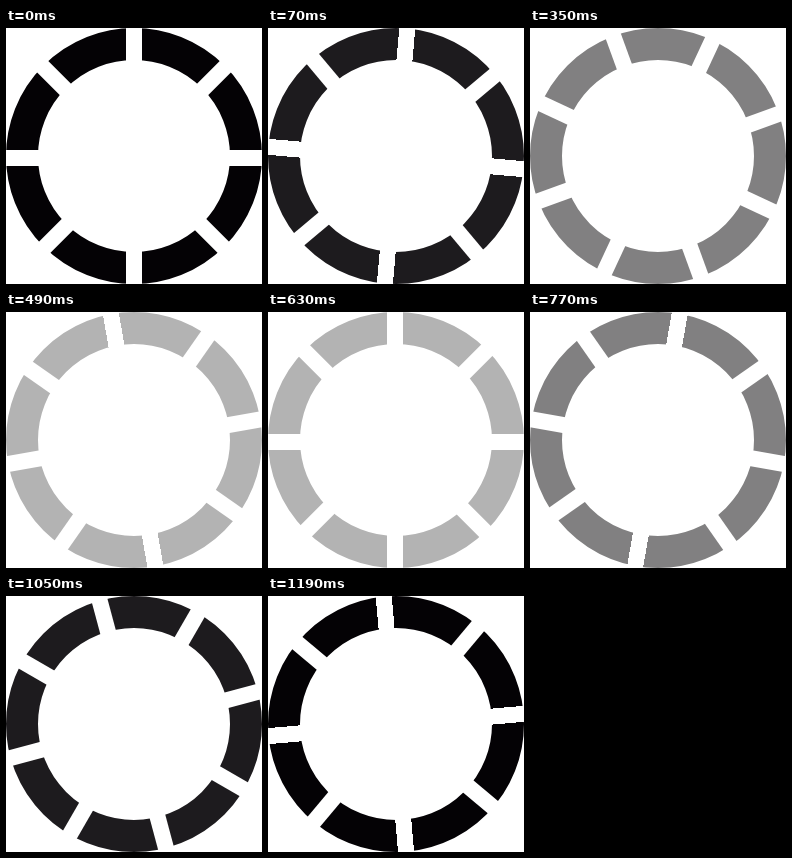
An HTML page that plays this animation: 256 px wide and 256 px high, repeating every 1.26 s.

```html
<!DOCTYPE html>
<html lang="en">
<head>
<meta charset="utf-8">
<title>Loading ring</title>
<style>
  html, body {
    margin: 0;
    width: 100%;
    height: 100%;
    overflow: hidden;
    background: #fff;
  }
  svg {
    display: block;
    width: 100%;
    height: 100%;
  }
  .ring {
    fill: none;
    stroke-width: 32;
    animation: fade 1260ms steps(8) infinite;
  }
  /* the gaps cross just below the pivot, so they wobble slightly */
  .gaps {
    stroke: #fff;
    stroke-width: 16;
    transform-origin: 128px 129px;
    animation: spin 1260ms steps(18) infinite;
  }
  @keyframes spin {
    from { transform: rotate(0deg); }
    to { transform: rotate(90deg); }
  }
  /* eight steps lighter, eight darker, then a short hold on black */
  @keyframes fade {
    0% { stroke: #040205; }
    44.44% { stroke: #ccc; }
    88.88%, 100% { stroke: #040205; }
  }
</style>
</head>
<body>
<svg viewBox="0 0 256 256">
  <circle class="ring" cx="128" cy="128" r="112"/>
  <g class="gaps">
    <path id="bar" d="M128 -10V270"/>
    <use href="#bar" transform="rotate(45 128 130)"/>
    <use href="#bar" transform="rotate(90 128 130)"/>
    <use href="#bar" transform="rotate(135 128 130)"/>
  </g>
</svg>
</body>
</html>
```
